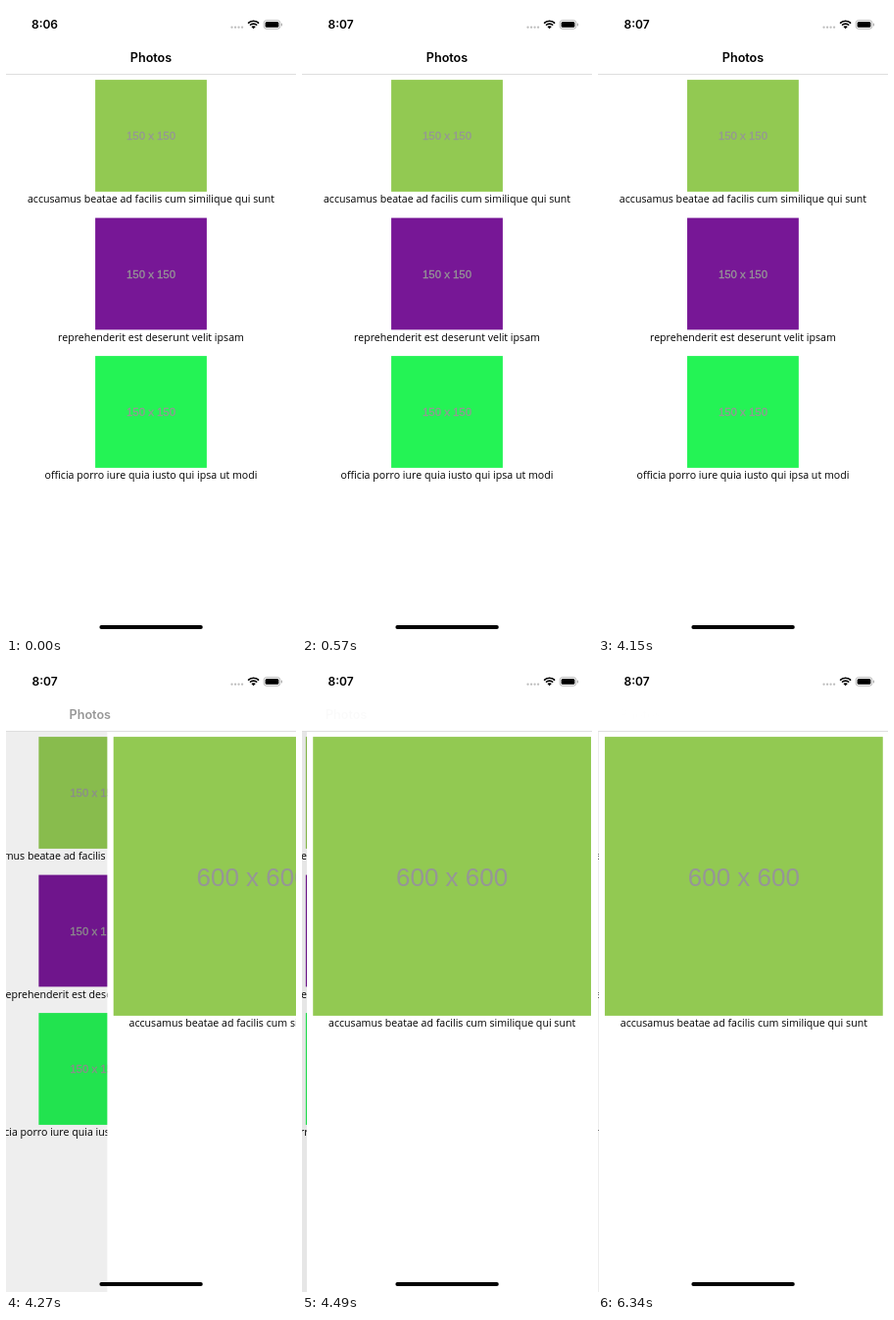
Write an HTML page with a canvas that moves like this. It is 296 by 640 pixels and loops after 7.49 s.

```html
<!DOCTYPE html>
<html lang="en">
<head>
<meta charset="utf-8">
<title>Photos</title>
<style>
  html, body { margin: 0; width: 100%; height: 100%; overflow: hidden; background: #fff; }
  canvas { display: block; width: 296px; height: 640px; }
</style>
</head>
<body>
<canvas id="stage"></canvas>
<script>
const W = 296, H = 640, LOOP = 7490, BAR = 69;
const CLOCK_TICK = 570;
// Screen refreshes during the push: [time in loop, ms since the push began]
const REFRESH = [[4150, 2], [4270, 129], [4380, 239], [4490, 349], [4610, 469]];
const UI = 'Inter, sans-serif';
const BODY = '10.63px "Open Sans", "Noto Sans", sans-serif';
const LABEL = '"Liberation Sans", Arial, sans-serif';
const PHOTOS = [
  ['#92c952', 'accusamus beatae ad facilis cum similique qui sunt'],
  ['#771796', 'reprehenderit est deserunt velit ipsam'],
  ['#24f355', 'officia porro iure quia iusto qui ipsa ut modi']
];

const canvas = document.getElementById('stage');
const ctx = canvas.getContext('2d');
const dpr = window.devicePixelRatio || 1;
canvas.width = W * dpr;
canvas.height = H * dpr;

// Critically damped spring: share of the distance still to go
function remaining(ms) {
  const k = 0.0172 * Math.max(0, ms);
  return (1 + k) * Math.exp(-k);
}

function rect(x, y, w, h, color) {
  ctx.fillStyle = color;
  ctx.fillRect(x, y, w, h);
}

function pill(x, y, w, h, r, color) {
  ctx.fillStyle = color;
  ctx.beginPath();
  ctx.roundRect(x, y, w, h, r);
  ctx.fill();
}

function text(str, x, y, font, color = '#000') {
  ctx.font = font;
  ctx.fillStyle = color;
  ctx.fillText(str, x, y);
}

function photo(y, size, color, label, fontSize, caption) {
  const mid = y + size / 2;
  rect((W - size) / 2, y, size, size, color);
  text(label, W / 2, mid + fontSize * 0.38, `${fontSize}px ${LABEL}`, '#969696');
  if (fontSize < 20) {
    ctx.strokeStyle = '#969696';
    ctx.lineWidth = 0.3;
    ctx.strokeText(label, W / 2, mid + fontSize * 0.38);
  }
  text(caption, W / 2, y + size + 11.3, BODY);
}

function list() {
  PHOTOS.forEach(([color, caption], i) =>
    photo(75.1 + 140.5 * i, 113.8, color, '150 x 150', 11.4, caption));
}

function detail() {
  rect(0, BAR, W, H - BAR, '#fff');
  const [color, caption] = PHOTOS[0];
  photo(75.1, 283.8, color, '600 x 600', 26, caption);
}

function wifi(x, y) {
  ctx.save();
  ctx.beginPath();
  ctx.moveTo(x, y);
  ctx.arc(x, y, 9, -Math.PI * 0.75, -Math.PI * 0.25);
  ctx.closePath();
  ctx.clip();
  ctx.strokeStyle = '#000';
  ctx.lineWidth = 1.8;
  for (const r of [8, 5]) {
    ctx.beginPath();
    ctx.arc(x, y, r, -Math.PI, 0);
    ctx.stroke();
  }
  ctx.beginPath();
  ctx.arc(x, y, 3, 0, Math.PI * 2);
  ctx.fillStyle = '#000';
  ctx.fill();
  ctx.restore();
}

function statusBar(clock) {
  text(clock, 39.5, 23.2, `600 12px ${UI}`);
  for (let i = 0; i < 4; i++) pill(229.4 + i * 3.5, 20.5, 2.3, 2.3, 1.15, '#bdbdbd');
  wifi(252.6, 23.2);
  ctx.strokeStyle = '#a6a6a6';
  ctx.lineWidth = 0.8;
  ctx.beginPath();
  ctx.roundRect(263.2, 14.6, 16.6, 8.6, 2.6);
  ctx.stroke();
  pill(264.6, 16, 13.8, 5.8, 1.5, '#000');
  pill(280.8, 17.4, 1.1, 3, 0.6, '#a6a6a6');
}

function draw(t) {
  const step = REFRESH.filter(([at]) => t >= at).pop();
  const elapsed = step ? step[1] : 0;
  const left = remaining(elapsed);
  const edge = W * left;

  ctx.setTransform(dpr, 0, 0, dpr, 0, 0);
  ctx.textAlign = 'center';
  rect(0, 0, W, H, '#fff');

  // Outgoing screen slides at a slower rate and darkens
  ctx.save();
  ctx.beginPath();
  ctx.rect(0, BAR, edge, H - BAR);
  ctx.clip();
  rect(0, BAR, W, H - BAR, '#fff');
  ctx.translate(-0.3 * (W - edge), 0);
  list();
  ctx.restore();
  rect(0, BAR, edge, H - BAR, `rgba(0, 0, 0, ${0.1 * (1 - left)})`);

  if (step) {
    ctx.save();
    ctx.translate(edge, 0);
    detail();
    ctx.restore();
  }

  rect(0, BAR, W, 1, '#dedede');
  const fade = remaining(elapsed - 13);
  text('Photos', W / 2 - 105 * (1 - fade), 57, `600 12.6px ${UI}`, `rgba(0, 0, 0, ${fade})`);
  statusBar(t < CLOCK_TICK ? '8:06' : '8:07');
  pill(95.4, 630, 105.4, 4, 2, '#000');
}

const start = performance.now();
function tick() {
  draw((performance.now() - start) % LOOP);
  requestAnimationFrame(tick);
}
tick();
</script>
</body>
</html>
```
